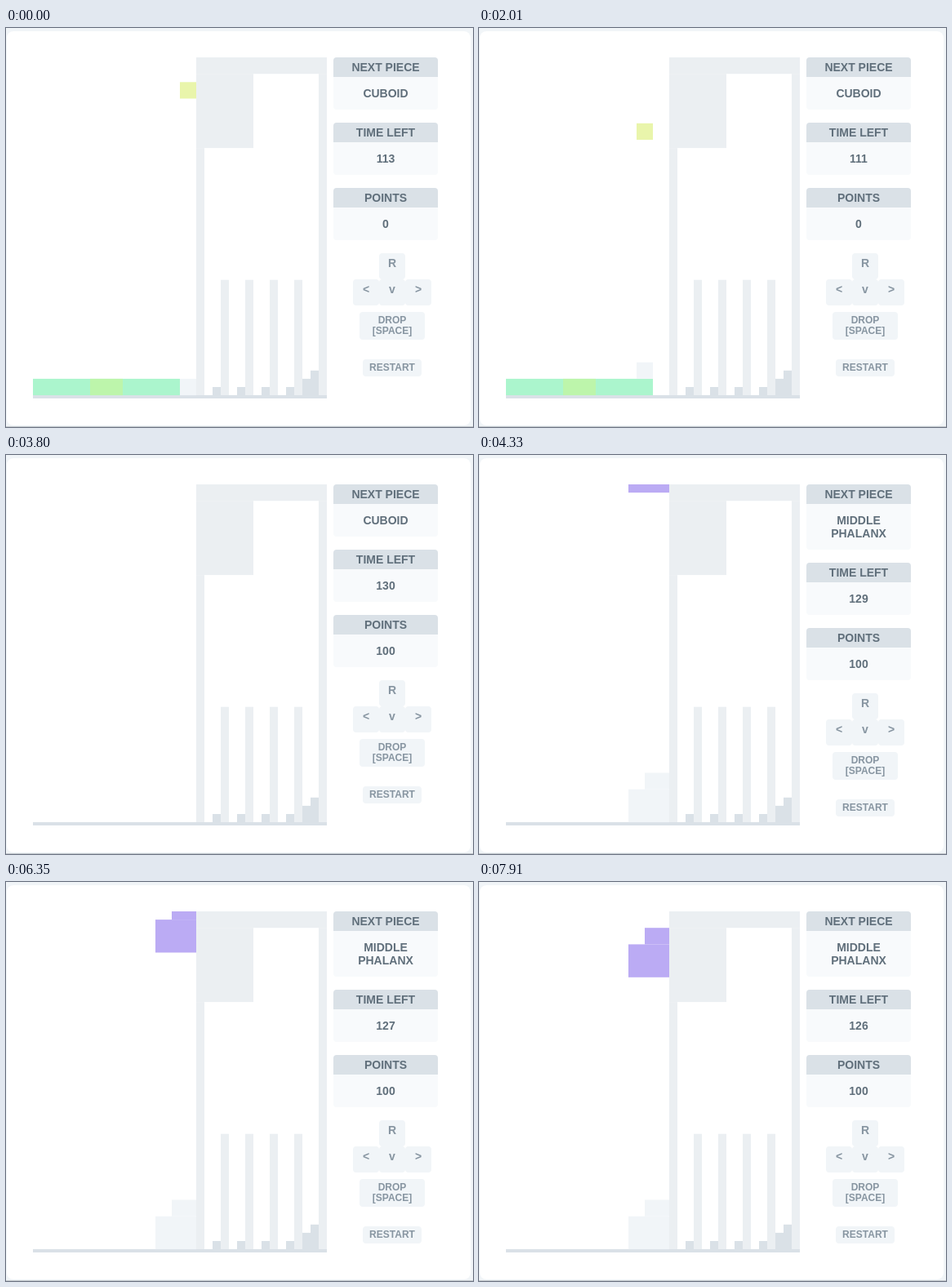
An HTML page with a canvas for the animation above (8150 ms loop, 572 px wide and 489 px high).

```html
<!DOCTYPE html>
<html lang="en">
<head>
<meta charset="utf-8">
<title>Falling blocks</title>
<style>
  html, body { margin: 0; width: 100%; height: 100%; overflow: hidden; background: #f1f5f8; }
  canvas { display: block; }
</style>
</head>
<body>
<canvas id="stage" width="572" height="489"></canvas>
<script>
const ctx = document.getElementById('stage').getContext('2d');

const LOOP = 8150;
const CLEARED = 3800;
const SPAWN = 4330;
const LEFT = 33, TOP = 36, COL = 10, ROW = 10.1, ROWS = 41;

const C = {
  page: '#f1f5f8', edge: '#c6cbcf', card: '#ffffff',
  head: '#dae1e7', body: '#f8fafc', button: '#f1f5f8',
  text: '#606f7b', label: '#8795a1',
  tower: '#ebeff2', solid: '#dae1e7', ghost: '#f1f5f8',
  mint: '#abf5cd', lime: '#bdf5ab', yellow: '#e9f5ab', violet: '#bbabf4'
};

// [time, column, top row] of each piece
const cubeMoves = [
  [0, 18, 3], [450, 18, 4], [1000, 18, 5], [1460, 18, 6], [1540, 18, 7],
  [1860, 17, 7], [2010, 16, 8], [2330, 17, 8], [2480, 18, 9],
  [3030, 18, 10], [3490, 18, 11]
];
const boneDrops = [4330, 4880, 5340, 5890, 6350, 6900, 7360, 7910];
const ticks = [1000, 2010, 3030, 4330, 5340, 6350, 7360];

// Pieces as lists of [column, row, width, height]
const cube = [[0, 0, 2, 2]];
const bone = [[2, 0, 3, 2], [0, 2, 5, 4]];

const passed = (list, t) => list.filter(x => x <= t).length;

function cells(col, row, w, h, color) {
  ctx.fillStyle = color;
  ctx.fillRect(LEFT + col * COL, TOP + row * ROW, w * COL, h * ROW);
}

function piece(shape, col, row, color) {
  ctx.fillStyle = color;
  for (const [x, y, w, h] of shape) {
    const top = Math.max(0, row + y), bottom = row + y + h;
    if (bottom > top) cells(col + x, top, w, bottom - top, color);
  }
}

function box(x, y, w, h, radii, color) {
  ctx.fillStyle = color;
  ctx.beginPath();
  ctx.roundRect(x, y, w, h, radii);
  ctx.fill();
}

function text(str, x, y, size, color) {
  ctx.font = `bold ${size}px "Liberation Sans", Arial, sans-serif`;
  ctx.textAlign = 'center';
  ctx.fillStyle = color;
  ctx.fillText(str, x, y);
}

// Draws a titled panel and returns the top of the next one
function panel(y, title, lines) {
  const h = 24 + 16 * lines.length;
  box(401, y, 128, 24, [4, 4, 0, 0], C.head);
  box(401, y + 24, 128, h, [0, 0, 4, 4], C.body);
  text(title, 465, y + 17, 14, C.text);
  lines.forEach((line, i) => text(line, 465, y + 49 + 16 * i, 14, C.text));
  return y + 24 + h + 16;
}

function button(x, y, w, h, lines, size, baseline) {
  box(x, y, w, h, 4, C.button);
  lines.forEach((line, i) => text(line, x + w / 2, y + baseline + 13 * i, size, C.label));
}

function drawCard() {
  ctx.fillStyle = C.page;
  ctx.fillRect(0, 0, 572, 489);
  box(1, 4, 568, 483, 8, C.card);
  ctx.fillStyle = C.edge;
  ctx.fillRect(0, 488, 572, 1);
}

function drawTower() {
  cells(20, 0, 16, 2, C.tower);
  cells(20, 2, 7, 9, C.tower);
  cells(20, 11, 1, 30, C.tower);
  cells(35, 2, 1, 39, C.tower);
  for (let i = 0; i < 4; i++) {
    cells(23 + 3 * i, 27, 1, 14, C.tower);
    cells(22 + 3 * i, 40, 1, 1, C.solid);
  }
  cells(33, 39, 1, 2, C.solid);
  cells(34, 38, 1, 3, C.solid);
  ctx.fillStyle = C.solid;
  ctx.fillRect(LEFT, 450, 360, 4);
}

function drawField(t) {
  if (t < CLEARED) {
    cells(0, 39, 18, 2, C.mint);
    cells(7, 39, 4, 2, C.lime);
    const [, col, row] = cubeMoves[passed(cubeMoves.map(m => m[0]), t) - 1];
    piece(cube, col, col < 18 ? 37 : 39, C.ghost);
    piece(cube, col, row, C.yellow);
  } else if (t >= SPAWN) {
    piece(bone, 15, ROWS - 6, C.ghost);
    piece(bone, 15, passed(boneDrops, t) - 6, C.violet);
  }
}

function drawSide(t) {
  const scored = t >= CLEARED;
  const time = 113 - passed(ticks, t) + (scored ? 20 : 0);
  let y = panel(36, 'NEXT PIECE', t < SPAWN ? ['CUBOID'] : ['MIDDLE', 'PHALANX']);
  y = panel(y, 'TIME LEFT', [String(time)]);
  y = panel(y, 'POINTS', [scored ? '100' : '0']);
  button(457, y, 32, 32, ['R'], 14, 17);
  ['<', 'v', '>'].forEach((key, i) => button(425 + 32 * i, y + 32, 32, 32, [key], 14, 17));
  button(433, y + 72, 80, 34, ['DROP', '[SPACE]'], 12, 14);
  button(437, y + 130, 72, 21, ['RESTART'], 12, 14);
}

let start;
function frame(now) {
  start ??= now;
  const t = (now - start) % LOOP;
  drawCard();
  drawTower();
  drawField(t);
  drawSide(t);
  requestAnimationFrame(frame);
}
requestAnimationFrame(frame);
</script>
</body>
</html>
```
